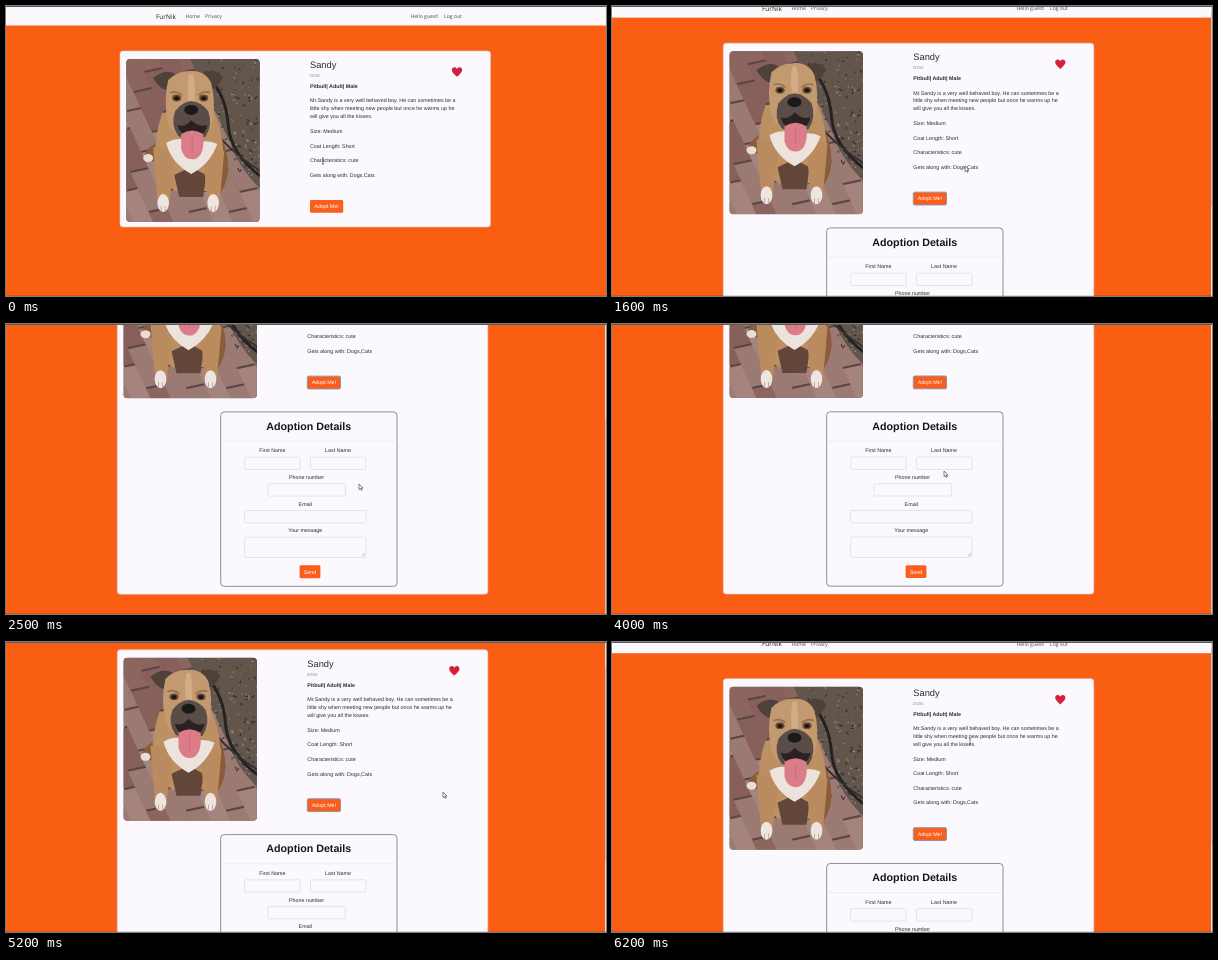
An HTML page that plays this animation: 600x290 px, repeating every 6.3 s.

```html
<!DOCTYPE html>
<html lang="en">
<head>
<meta charset="utf-8">
<title>Pet adoption page</title>
<style>
html, body { margin: 0; width: 100%; height: 100%; overflow: hidden; background: #fa5e13; }
svg { display: block; width: 600px; height: 290px; }
text { font-family: "Liberation Sans", Arial, sans-serif; font-size: 5.35px; fill: #2b2b31; text-rendering: geometricPrecision; }
.nav text { font-family: "Open Sans", "Noto Sans", sans-serif; font-size: 5.1px; fill: #4a4a50; }
.nav .brand { font-size: 6.5px; fill: #222; }
.title { font-size: 9.3px; }
.kind { font-size: 4.4px; fill: #85858c; }
.bold { font-weight: bold; }
.heading { font-size: 10.7px; font-weight: bold; fill: #17171b; }
.middle { text-anchor: middle; }
.on-button { fill: #fff; }
.field { fill: #fbf9fd; stroke: #dcdae0; stroke-width: .7; }
</style>
</head>
<body>
<svg id="stage" viewBox="0 0 600 290"></svg>
<script>
const LOOP = 6300, STEP = 100, OPEN_AT = 800;
const PAPER = "#fbf9fe", ORANGE = "#fa5e1c";

const text = (x, y, content, cls = "") => `<text x="${x}" y="${y}" class="${cls}">${content}</text>`;
const rect = (x, y, w, h, attrs) => `<rect x="${x}" y="${y}" width="${w}" height="${h}" ${attrs}/>`;
const path = (d, fill, attrs = "") => `<path d="${d}" fill="${fill}" ${attrs}/>`;
const oval = (x, y, rx, ry, fill) => `<ellipse cx="${x}" cy="${y}" rx="${rx}" ry="${ry}" fill="${fill}"/>`;
const field = (x, y, w, h) => rect(x, y, w, h, 'rx="1.2" class="field"');
const repeat = (n, draw) => Array.from({ length: n }, (_, i) => draw(i)).join("");

function seeded(seed) {
  return () => (seed = (seed * 16807) % 2147483647) / 2147483647;
}

// Skewed courses of bricks, each brick with its own tint.
function bricks() {
  const random = seeded(17);
  const tones = ["#9c7a74", "#8d655f", "#a5847d", "#87605b"];
  const courses = repeat(11, row => repeat(6, k => {
    const y = k * 40 - (row % 2) * 20 - 6, x = -88 + row * 20 + y * .46;
    const tone = tones[Math.floor(random() * 4)];
    return path(`M${x} ${y}l18.5 -4l17.5 38l-18.5 4Z`, tone);
  }));
  return rect(0, 0, 134, 163, 'fill="#5b4643"') + courses;
}

function mulch() {
  const random = seeded(41);
  const tones = ["#85776c", "#443a35", "#9a8b7f", "#352e2b"];
  const chips = repeat(130, i => {
    const y = random() * 116, left = 68 + y * .4;
    const x = left + random() * (134 - left);
    return path(`M${x} ${y}l${random() * 6 - 3} ${random() * 4 - 1}`, "none",
      `stroke="${tones[i % 4]}" stroke-width="1.2"`);
  });
  return path("M64 0H134V130Q112 108 104 84Z", "#61554c") + chips +
    path("M84 20Q100 38 102 66T134 117", "none", 'stroke="#252224" stroke-width="3"') +
    path("M92 76Q104 92 134 112", "none", 'stroke="#35302f" stroke-width="2"');
}

function dog() {
  const leg = (x, tilt) =>
    path(`M${x - 11 + tilt} 88Q${x - 8} 118 ${x - 5} 146H${x + 6}Q${x + 9} 118 ${x + 12 + tilt} 92Z`, "#ba8b5e") +
    oval(x, 144, 5.8, 9, "#eee5e0") +
    path(`M${x - 2} 147v5m4 -5v5`, "none", 'stroke="#a89590" stroke-width=".7"');
  const eye = x => oval(x, 39, 4.6, 3.4, "#6b4c37") + oval(x, 39.3, 2.6, 2.1, "#1b1512");
  return path("M29 84Q18 92 18 99L29 103ZM94 75Q110 112 94 134L75 130Z", "#8a5c3b") +
    oval(22, 99, 5, 4, "#e8ddd7") +
    path("M36 54Q28 76 30 98Q36 124 49 132H82Q98 116 97 91Q95 65 86 50Z", "#bd9062") +
    path("M48 116L65 108L80 116L77 138H53Z", "#63463a") +
    leg(37, 1) + leg(87, -1) +
    path("M40 84Q53 76 67 84Q82 80 91 85Q84 105 65 115Q45 104 40 84Z", "#ece3dd") +
    path("M27 19Q39 9 49 15L42 32Q33 30 27 19ZM77 14Q88 8 97 18Q92 29 84 31Z", "#4d4139") +
    path("M42 21Q51 12 64 12Q79 11 85 24Q90 44 86 64Q81 80 66 82Q48 80 42 64Q37 41 42 21Z", "#c39a70") +
    path("M63 15Q60 30 63 46H68Q70 30 67 15Z", "#d1ac86") +
    path("M44 34Q50 31 56 36M72 36Q79 31 84 34", "none", 'stroke="#94704f" stroke-width="1.6"') +
    path("M49 52Q56 43 65 42Q75 43 82 52Q87 66 79 78Q66 84 52 77Q44 66 49 52Z", "#5a4d47") +
    path("M51 66Q59 69 65 61Q73 69 81 66Q78 79 66 79Q55 78 51 66Z", "#292122") +
    path("M55 75Q66 68 77 75Q79 96 69 100Q58 102 55 90Z", "#db7c89") +
    path("M66 77V93", "none", 'stroke="#c0697a" stroke-width=".8"') +
    oval(65, 51, 7, 5, "#1b1a1b") + eye(50.5) + eye(77.5);
}

function nav() {
  return `<g class="nav">` + rect(0, 0, 600, 19.5, `fill="${PAPER}"`) +
    text(150, 12.6, "FurNik", "brand") + text(179.5, 12.2, "Home") + text(199, 12.2, "Privacy") +
    text(404.5, 12.2, "Hello guest!") + text(438, 12.2, "Log out") + `</g>`;
}

function card() {
  const lines = [
    [96.4, "Mr.Sandy is a very well behaved boy. He can sometimes be a"],
    [104.3, "little shy when meeting new people but once he warms up he"],
    [112.2, "will give you all the kisses."],
    [127, "Size: Medium"], [141.6, "Coat Length: Short"],
    [156.2, "Characteristics: cute"], [170.8, "Gets along with: Dogs,Cats"]
  ];
  return `<g id="card">` +
    rect(114, 45, 370.5, 176, `id="panel" rx="3" fill="${PAPER}" stroke="#dccfcd" stroke-width=".6"`) +
    `<g transform="translate(120.2 53)" clip-path="url(#photo)">${bricks()}${mulch()}${dog()}</g>` +
    text(304, 62.2, "Sandy", "title") + text(304, 71.3, "DOG", "kind") +
    text(304, 81.9, "Pitbull| Adult| Male", "bold") +
    lines.map(([y, line]) => text(304, y, line)).join("") +
    path("M451 70.8C448 68 445.9 66.4 445.9 63.9C445.9 60.9 449.6 60.3 451 62.9C452.4 60.3 456.1 60.9 456.1 63.9C456.1 66.4 454 68 451 70.8Z", "#d51f3b") +
    rect(304, 194, 33.2, 12.8, 'id="adopt" rx="1.4"') +
    text(320.6, 202.3, "Adopt Me!", "middle on-button") + `</g>`;
}

function form() {
  const label = (x, y, name) => text(x, y, name, "middle");
  return `<g id="form">` +
    rect(214.7, 229.8, 176.3, 174.4, `rx="3.5" fill="${PAPER}" stroke="#75747b" stroke-width=".8"`) +
    text(302.8, 247.7, "Adoption Details", "heading middle") +
    path("M215 259H391", "none", 'stroke="#e9e7ec" stroke-width=".7"') +
    label(266.4, 270, "First Name") + field(238.6, 275, 55.4, 12.4) +
    label(332, 270, "Last Name") + field(304.5, 275, 55.4, 12.4) +
    label(300.5, 297, "Phone number") + field(262, 301.6, 77.4, 12.4) +
    label(299.3, 323.6, "Email") + field(238.6, 328.4, 121.4, 12.4) +
    label(299.3, 350, "Your message") + field(238.6, 355, 121.4, 20.4) +
    path("M356 374l3 -3m-1.3 3l1.3 -1.3", "none", 'stroke="#88868c" stroke-width=".5"') +
    rect(293.6, 383.2, 20.8, 12.8, `rx="1.4" fill="${ORANGE}"`) +
    text(304, 391.5, "Send", "middle on-button") + `</g>`;
}

const pointers = {
  arrow: path("M0 0V5.6L1.4 4.4L2.3 6.4L3.2 6L2.3 4.1H4Z", "#fff", 'stroke="#333" stroke-width=".6"'),
  beam: path("M-1.2 -3H1.2M0 -3V3M-1.2 3H1.2", "none", 'stroke="#333" stroke-width=".6"'),
  hand: path("M-.6 -2.8Q0 -3.5 .6 -2.8V-.6L2.7 0Q3.2 2 2 4H-1.2L-2.7 1.4L-.6 1.7Z", "#fff", 'stroke="#222" stroke-width=".5"')
};

document.getElementById("stage").innerHTML =
  `<defs><clipPath id="photo">${rect(0, 0, 133.4, 163, 'rx="4"')}</clipPath></defs>` +
  rect(0, 0, 600, 290, 'fill="#fa5e13"') +
  `<g id="page">${nav()}${card()}${form()}</g>` +
  `<g id="scrollbar">${rect(599, 0, 1, 290, 'fill="#f1dfd6"')}${rect(599, 0, 1, 195, 'id="thumb" fill="#d3bfb6"')}</g>` +
  rect(0, 0, 600, 1, 'fill="#5d595b"') + rect(0, 289, 600, 1, 'fill="#000" opacity=".12"') +
  Object.entries(pointers).map(([name, shape]) => `<g id="${name}">${shape}</g>`).join("");

const el = id => document.getElementById(id);
const set = (id, attrs) => {
  for (const name in attrs) el(id).setAttribute(name, attrs[name]);
};
const show = (id, on) => set(id, { visibility: on ? "visible" : "hidden" });

// Each key is [time, ...values]; values are joined by straight segments.
function track(keys, t) {
  const next = keys.findIndex(key => key[0] > t);
  if (next < 0) return keys[keys.length - 1].slice(1);
  if (next === 0) return keys[0].slice(1);
  const a = keys[next - 1], b = keys[next];
  const k = (t - a[0]) / (b[0] - a[0]);
  return a.slice(1).map((v, i) => v + (b[i + 1] - v) * k);
}

// A flick of the wheel: picks up speed, then settles softly.
const glide = (t, start, span) => 1 - Math.exp(-(Math.max(0, (t - start) / span) ** 2.085));
const scrollAt = t => 142 * glide(t, 1500, 395) - 133.7 * glide(t, 4600, 489);

const pointerKeys = [
  [0, 317, 155], [200, 317, 157], [700, 315, 204], [1200, 315, 204], [1600, 353, 160],
  [2800, 353, 160], [3500, 340, 147], [4000, 332, 147], [4200, 332, 147],
  [4500, 437, 150], [6000, 437, 150], [6200, 358, 99]
];

function render(t) {
  const open = t >= OPEN_AT;
  const scroll = scrollAt(t);
  const [x, y] = track(pointerKeys, t);
  const hover = t >= 700 && t < 1300;
  const pointer = hover ? "hand" : t < 600 || t >= 6200 ? "beam" : "arrow";

  set("page", { transform: `translate(0 ${-scroll})` });
  set("card", { transform: `translate(${open ? -2.7 : 0} 0)` });
  set("panel", { height: open ? 367 : 176 });
  set("adopt", {
    fill: hover ? "#2466ae" : ORANGE,
    stroke: hover ? "#173e70" : open ? "#8d94a8" : "none",
    "stroke-width": 1,
    "stroke-dasharray": hover ? "1 .8" : "none"
  });
  show("form", open);
  show("scrollbar", open);
  set("thumb", { y: scroll * .67 });
  for (const name in pointers) show(name, name === pointer);
  set(pointer, { transform: `translate(${x} ${y})` });
}

const start = performance.now();
function tick() {
  const t = (performance.now() - start) % LOOP;
  render(Math.floor(t / STEP) * STEP);
  requestAnimationFrame(tick);
}
tick();
</script>
</body>
</html>
```
